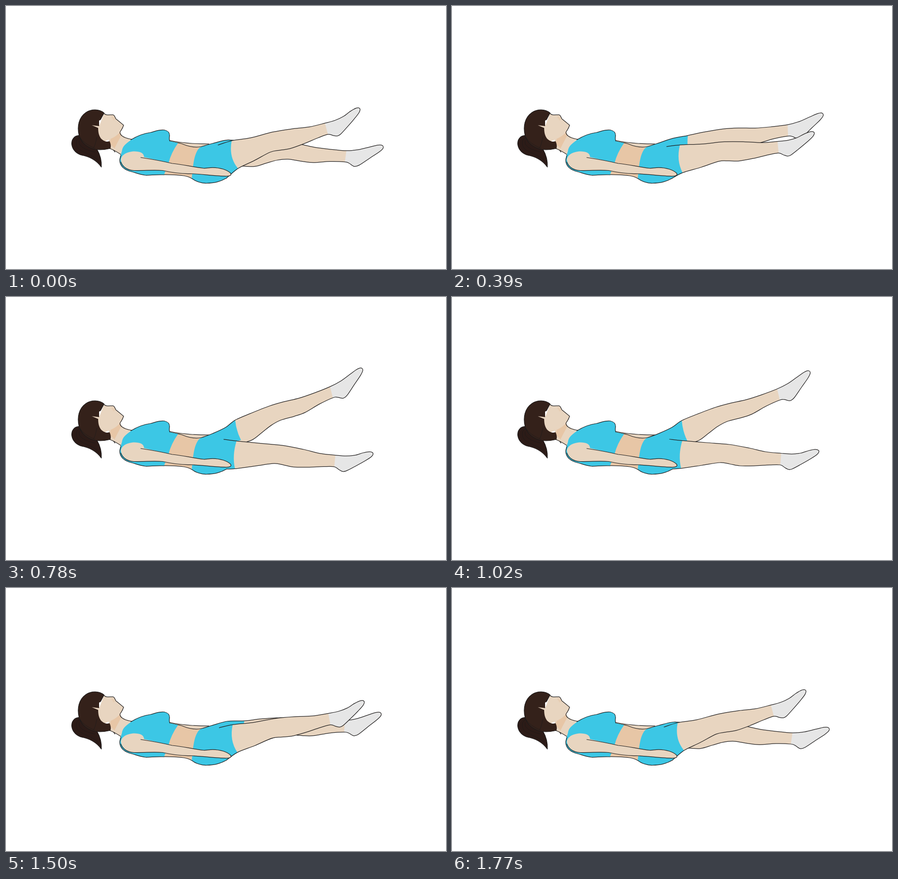
Write an HTML page that moves like this. It is 969 px wide and 578 px high and loops after 1.8 s.

```html
<!DOCTYPE html>
<html lang="en">
<head>
<meta charset="utf-8">
<title>Flutter kicks</title>
<style>
  html, body { margin: 0; width: 100%; height: 100%; overflow: hidden; background: #fff; }
  svg { display: block; width: 100%; height: 100%; }
  path { fill: none; stroke-linecap: round; stroke-linejoin: round; }
  .skin { fill: #e8d5c0; }
  .shade { fill: #e7c6a6; }
  .blue { fill: #3cc7e5; }
  .sock { fill: #e6e6e6; }
  .hair { fill: #34211a; }
  .line { stroke: #1c1a1a; stroke-width: 1.25; }
</style>
</head>
<body>
<svg viewBox="0 0 969 578">
  <!-- far arm -->
  <path class="skin" d="M361 295C385 301 410 303 447 303L431 310L400 309L365 300Z"/>
  <path class="line" d="M361 295.500C385 301 410 303 447 303"/>

  <g id="far"></g>

  <!-- waist and shorts -->
  <path class="shade" d="M361 297C372 300 380 300 388 303C402 309 415 312 431 309L416 340L410 379C398 371 375 371 345 370L350 340Z"/>
  <path class="blue" d="M431 309C419 313 414 335 412 352L409 379C420 387 430 389.500 441 389.500C460 389 472 386 486 378L480 330Z"/>
  <g id="near"></g>
  <path class="line" d="M361 297C372 300 380 300 388 303C402 309 415 312 431 309"/>
  <path class="line" d="M345 370.500C370 371 398 371 409 379C420 387 430 389.500 441 389.500C460 389 472 386 486 378"/>

  <!-- ponytail -->
  <path class="hair line" style="fill:#2c1b17" d="M163 284.500C150 284 143 294 145 306C147 317 156 325 167 328C184 331 198 338 210 354C211 340 207 326 200 314C186 300 175 289 163 284.500Z"/>
  <path class="line" style="stroke-width:.7" d="M163 289C153 291 152 307 161 315C174 324 192 328 202 338M161 296C158 308 174 316 195 321"/>

  <!-- neck and face -->
  <path class="skin" d="M226 292L251 276C251 284 259 289 277 293L264 308L254 327L238 318L228 313Z"/>
  <path class="shade" d="M252 276L231 290L228 302L239 313L245 301L253 286Z"/>
  <path class="line" d="M251 276C250 285 260 290 277 293M228 313C237 316 245 321 254 327M237 317L240 321"/>
  <path class="skin" d="M216 236C220 241 227 239 236 239C240 241 240 245 242 248C247 252 252 256 259 262C257 269 253 274 251 277C246 283 240 288 230 292L216 298L200 285L188 261L206 262Z"/>
  <path class="shade" style="opacity:.45" d="M231 243Q237 242 241 248L237 252Z"/>
  <path class="line" d="M216 236C220 241 227 239 236 239C240 241 240 245 242 248C247 252 252 256 259 262C257 269 253 274 251 277"/>
  <path class="hair" d="M216 235C205 226 188 226 176 234C160 245 156 265 161 285C166 300 178 311 195 315C208 317 222 315 230 313C232 307 230 301 228 297C221 300 214 296 209 291C204 284 203 276 203 268L189 262L205 264L205 252L208 250Z"/>
  <path class="line" d="M208 250L216 235C205 226 188 226 176 234C160 245 156 265 161 285C166 300 178 311 195 315C208 317 222 315 230 313"/>
  <path class="line" style="stroke-width:.7" d="M161 285C166 297 180 306 196 313M200 288C198 298 197 305 193 311"/>

  <!-- top -->
  <path class="blue" d="M277 293C290 285 302 280 318 278C330 275 337 271 349 272.500C359 275 361 280 360 287Q359 294 361 297L379 301Q364 322 358 345L348 371C332 370 320 372 308 372C295 371 285 366 272 363C258 358 250 350 250 338C251 328 255 323 256 315C259 305 268 300 277 293Z"/>
  <path class="line" d="M275 294C290 285 302 280 318 278C330 275 337 271 349 272.500C359 275 361 280 360 287Q359 294 361 297M348 371C332 370 320 372 308 372C295 371 285 366 272 363C258 358 250 350 250.500 338L253 328"/>

  <!-- near arm -->
  <path class="skin" d="M304 332C304 322 293 319 280 319.500C265 321 255 327 253 337C254 349 264 360 282 361.500C305 362 325 360 345 361.500C365 366 385 369 405 368.500C430 369 460 374 485 374C493 374 497 372 495 368C488 360 471 355 455 355C447 355 441 357 435 356.500C411 354 390 348 366 346C345 341 323 337 304 332Z"/>
  <path class="line" d="M253 343C256 352 266 361 282 361.500C305 362 325 360 345 361.500C365 366 385 369 405 368.500C430 369 460 374 485 374C493 374 497 372 495 368C488 360 471 355 455 355C447 355 441 357 435 356.500C411 354 390 348 366 346C345 341 323 337 297 333"/>
</svg>
<script>
const PERIOD = 1800, STEP = 30, POSE = 0.933; // leg points below are given at ease = POSE
const lerp = (a, b, e) => a.map((v, i) => v + (b[i] - v) * e);

// Each leg runs hip -> toe -> hip; `foot` is the index range of the sock.
const far = {
  pivot: [430, 348], swing: -23.3, bend: 8, foot: [6, 18],
  pts: [[506, 272], [540, 258], [580, 243], [612, 234], [648, 226], [682, 215],
    [716, 202], [740, 190], [760, 176], [776, 165], [785, 162], [789, 167], [784, 178],
    [770, 198], [754, 221], [746, 227.5], [740, 227.5], [732, 225.5], [722, 226.5],
    [692, 240], [660, 258], [636, 266], [606, 274], [585, 285], [565, 300], [543, 316], [513, 325]],
  hem: [[506, 272], [508, 296], [518, 316]]
};
const near = {
  pivot: [460, 367], swing: 20.7, bend: 0, foot: [4, 16],
  pts: [[560, 320], [610, 324], [655, 332], [690, 340],
    [725, 343.5], [748, 345], [768, 343], [786, 337.5], [801, 335], [808, 338.5], [804, 346],
    [789, 356], [768, 368], [749, 378], [741, 379], [733, 375], [723, 369],
    [700, 369], [665, 371], [634, 371], [612, 367], [590, 364], [550, 370]]
};

function place(leg, e) {
  const a = (e - POSE) * leg.swing * Math.PI / 180, c = Math.cos(a), s = Math.sin(a);
  const [px, py] = leg.pivot;
  return ([x, y]) => {
    const dx = x - px, dy = y - py, r = Math.hypot(dx, dy);
    const lift = r < 320 ? leg.bend * (1 - e) * Math.sin(Math.PI * r / 320) : 0;
    return [px + dx * c - dy * s, py + dx * s + dy * c - lift];
  };
}

// Smooth path through p[from..to]
function curve(p, from = 0, to = p.length - 1) {
  const at = i => p[Math.max(0, Math.min(p.length - 1, i))];
  const ctrl = (i, k) => at(i).map((v, j) => v + k * (at(i + 1)[j] - at(i - 1)[j]) / 6);
  let d = "M" + p[from];
  for (let i = from; i < to; i++) d += "C" + [ctrl(i, 1), ctrl(i + 1, -1), p[i + 1]];
  return d;
}

function makeLeg(id) {
  const group = document.getElementById(id);
  const parts = ["skin", "blue", "sock", "line"].map(name => {
    const path = document.createElementNS("http://www.w3.org/2000/svg", "path");
    path.setAttribute("class", name);
    return group.appendChild(path);
  });
  return (outline, blue, [a, b]) => {
    const d = curve(outline);
    [d + "Z", blue, curve(outline, a, b) + "Z", d]
      .forEach((v, i) => parts[i].setAttribute("d", v));
  };
}
const drawFar = makeLeg("far"), drawNear = makeLeg("near");

function pose(e) {
  const put = place(far, e);
  const hip = [[431, 309], lerp([455, 302], [455, 300], e), lerp([489, 294.5], [484, 286], e)];
  const farLine = [...hip, ...far.pts.map(put)];
  const [, mid, low] = far.hem.map(put);
  drawFar(farLine, curve(farLine, 0, 3) + `Q${mid} ${low}L440 340Z`, far.foot.map(i => i + 3));

  const start = lerp([467, 305.5], [480, 313], e);
  const top = lerp([497, 296], [508, 317], e);
  const bulge = lerp([490, 332], [498, 348], e);
  const bottom = lerp([511, 357], [504, 378], e);
  const nearLine = [start, top, ...near.pts.map(place(near, e)), bottom, [486, 378]];
  drawNear(nearLine,
    curve(nearLine, 0, 1) + `Q${bulge} ${bottom}L486 378L430 380L414 345L431 309Z`,
    near.foot.map(i => i + 2));
}

function frame() {
  const t = Math.floor(performance.now() / STEP) * STEP % PERIOD;
  pose((1 - Math.cos(2 * Math.PI * (t + STEP) / PERIOD)) / 2);
  requestAnimationFrame(frame);
}
frame();
</script>
</body>
</html>
```
